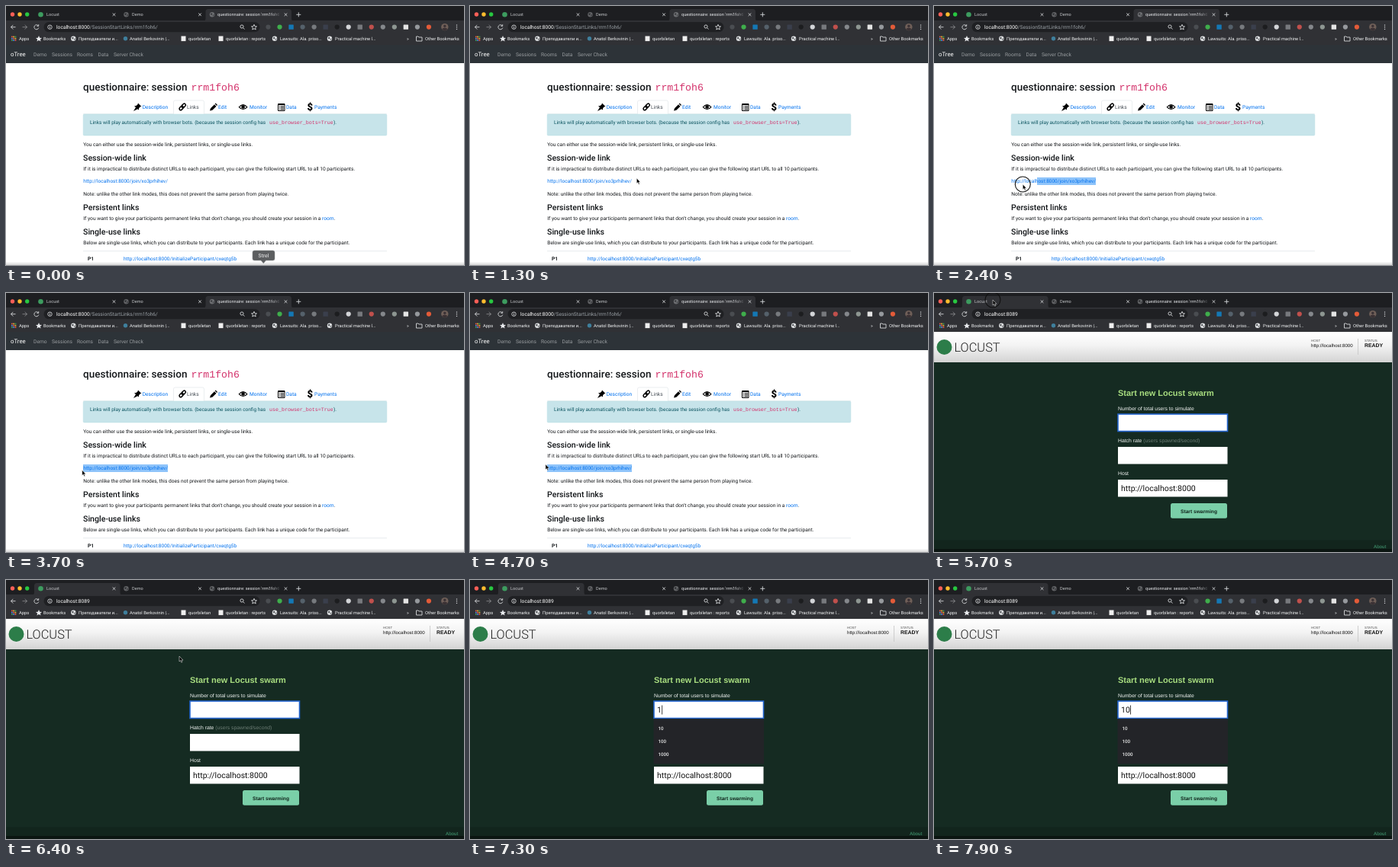
Write an HTML page that moves like this. It is 600 px wide and 340 px high and loops after 8000 ms.

```html
<!DOCTYPE html>
<html lang="en">
<head>
<meta charset="utf-8">
<title>Session links</title>
<style>
html, body { margin: 0; width: 100%; height: 100%; overflow: hidden; }
svg { display: block; width: 600px; height: 340px; font-family: Roboto, Inter, sans-serif; text-rendering: geometricPrecision; }
text { white-space: pre; }
.tabs text { font-size: 5.6px; fill: #c3c5c8; }
.marks text { font-size: 5.8px; fill: #f1f3f4; }
.nav text { font-size: 6.7px; fill: #979b9e; }
.body { font-size: 6.62px; fill: #14171a; }
.body .h { font-size: 10.6px; font-weight: 500; }
.body .a { fill: #0071ee; }
.body .url { font-size: 6.5px; }
.code { font-family: "Liberation Mono", monospace; fill: #d3326b; }
.swarm { font-family: "Liberation Sans", Arial, sans-serif; font-size: 6.8px; fill: #f2f5f3; }
.ui { font-family: Roboto, Inter, sans-serif; }
.line { fill: none; stroke: #d5d7da; stroke-width: .9; }
</style>
</head>
<body>
<svg viewBox="0 0 600 340">
  <defs>
    <linearGradient id="fade" gradientUnits="userSpaceOnUse" x1="347" x2="360">
      <stop stop-color="#e8eaed"/><stop offset="1" stop-color="#e8eaed" stop-opacity="0"/>
    </linearGradient>
    <linearGradient id="head" x2="0" y2="1">
      <stop stop-color="#fff"/><stop offset=".45" stop-color="#f3f3f3"/><stop offset="1" stop-color="#d3d3d3"/>
    </linearGradient>
    <linearGradient id="shade" x2="0" y2="1">
      <stop stop-opacity="0"/><stop offset="1" stop-opacity=".16"/>
    </linearGradient>
    <g id="globe">
      <circle r="3.2" fill="#dfe1e3"/>
      <path d="M-2.4-1.4L0-2 .3-.2-1 .9ZM.8.6L2.4-.6 2.2 1.3 1 2.2Z" fill="#4a4d51"/>
    </g>
    <path id="close" d="M-1.8-1.8L1.8 1.8M1.8-1.8L-1.8 1.8" class="line"/>
  </defs>

  <g id="links" class="body">
    <rect width="600" height="340" fill="#fff"/>
    <rect y="335.5" width="600" height="4.5" fill="url(#shade)"/>
    <rect y="51" width="600" height="24" fill="#2d3338"/>
    <g class="nav">
      <text x="6" y="66.3" style="font-size:7.8px;fill:#fff">oTree</text>
      <text x="36" y="66">Demo</text>
      <text x="60" y="66">Sessions</text>
      <text x="93" y="66">Rooms</text>
      <text x="120.5" y="66">Data</text>
      <text x="141" y="66">Server Check</text>
    </g>
    <text x="101" y="111" style="font-size:13.5px;font-weight:500">questionnaire: session</text>
    <text x="242.5" y="111" class="code" font-size="13.2">rrm1foh6</text>

    <path d="M101 141.7H219.5V126Q219.5 124 221.5 124H257.5Q259.5 124 259.5 126V141.7H499" fill="none" stroke="#dee2e6" stroke-width=".6"/>
    <g class="a">
      <text x="178.7" y="135">Description</text>
      <text x="237" y="135" fill="#495057">Links</text>
      <text x="278" y="135">Edit</text>
      <text x="319" y="135">Monitor</text>
      <text x="367" y="135">Data</text>
      <text x="404" y="135">Payments</text>
    </g>
    <g fill="#000">
      <path d="M173 127.5L177.5 132 175.8 132.3 174 134.3 174 136.5 172.3 135.2 167 138 170 133 168 131.3 170.5 131 172.5 129.2Z"/>
      <g fill="none" stroke="#000" stroke-width="1.5">
        <rect x="-3" y="-1.8" width="6" height="3.6" rx="1.8" transform="translate(232.7 130.8) rotate(-45)"/>
        <rect x="-3" y="-1.8" width="6" height="3.6" rx="1.8" transform="translate(229.7 134) rotate(-45)"/>
      </g>
      <path d="M267 137.5L268 134.2 273 129.2 275.5 131.7 270.3 136.7ZM273.7 128.5L274.7 127.5 277 129.9 276.1 131Z"/>
      <path d="M304.5 132.7Q310.5 125.5 316.7 132.7 310.5 139.5 304.5 132.7Z"/>
      <path d="M306 132.8Q310.5 128.3 315.2 132.8 310.5 137 306 132.8Z" fill="#fff"/>
      <circle cx="310.6" cy="132.5" r="2.3"/>
      <path d="M356.5 128.5H365V137.5H356.5Z" fill="none" stroke="#000"/>
      <path d="M357 129.5H365M358 131.7H359.3M360 131.7H364M358 133.7H359.3M360 133.7H364M358 135.7H359.3M360 135.7H364" stroke="#000"/>
      <text x="398.3" y="137" text-anchor="middle" font-size="13" font-weight="900">$</text>
    </g>

    <rect x="101.2" y="142" width="397.6" height="28" rx="1.5" fill="#c7e4ea" stroke="#b7dce3" stroke-width=".5"/>
    <g fill="#0c5460">
      <text x="110" y="155.2" font-size="6.5">Links will play automatically with browser bots. (because the session config has</text>
      <text x="345" y="155.2" class="code" font-size="6.65">use_browser_bots=True</text>
      <text x="429" y="155.2">).</text>
    </g>

    <text x="101.3" y="184">You can either use the session-wide link, persistent links, or single-use links.</text>
    <text x="101" y="203.2" class="h">Session-wide link</text>
    <text x="101.3" y="216">If it is impractical to distribute distinct URLs to each participant, you can give the following start URL to all 10 participants.</text>
    <rect id="sel" y="225" height="10" fill="#8fc4fa"/>
    <text x="101.3" y="232.3" class="a url">http://localhost:8000/join/xo3prhihev/</text>
    <text x="101.3" y="249">Note: unlike the other link modes, this does not prevent the same person from playing twice.</text>
    <text x="101" y="268" class="h">Persistent links</text>
    <text x="101.3" y="281">If you want to give your participants permanent links that don't change, you should create your session in a <tspan class="a">room</tspan>.</text>
    <text x="101" y="300" class="h">Single-use links</text>
    <text x="101.3" y="312.5">Below are single-use links, which you can distribute to your participants. Each link has a unique code for the participant.</text>
    <path d="M101 321.7H499" stroke="#dee2e6" stroke-width=".7"/>
    <text x="107" y="334" font-weight="700">P1</text>
    <text x="154" y="334" class="a url">http://localhost:8000/InitializeParticipant/cxeqtg5b</text>
    <g id="tip">
      <path d="M325.5 321H349.5Q352 321 352 323.5V331.5Q352 334 349.5 334H340.5L337.3 337.8 334 334H325.5Q323 334 323 331.5V323.5Q323 321 325.5 321Z" fill="#5c5e60" stroke="#86888a" stroke-width=".5"/>
      <text x="337.5" y="329.8" text-anchor="middle" font-size="6.8" fill="#f2f2f2">Strel</text>
    </g>
  </g>

  <g id="swarm" class="swarm">
    <rect width="600" height="340" fill="#152b22"/>
    <rect y="324.5" width="600" height="16" fill="#12251d"/>
    <rect y="336" width="600" height="4" fill="#0b1511"/>
    <rect y="51" width="600" height="40" fill="url(#head)"/>
    <circle cx="13.5" cy="71" r="10" fill="#2c7d49"/>
    <text x="26.5" y="76.8" class="ui" font-weight="300" style="font-size:16.4px;fill:#222">LOCUST</text>
    <g fill="#111">
      <text x="494" y="64" style="font-size:4.4px;fill:#555">HOST</text>
      <text x="494" y="70.7" style="font-size:6.1px">http://localhost:8000</text>
      <text x="564" y="64" style="font-size:4.4px;fill:#555">STATUS</text>
      <text x="564" y="71.3" font-weight="700" style="font-size:6.9px">READY</text>
    </g>
    <path d="M555.5 60V81" stroke="#c4c4c4" stroke-width=".8"/>
    <text x="241" y="135" font-weight="700" style="font-size:10.95px;fill:#a9de80">Start new Locust swarm</text>
    <text x="241" y="153.5">Number of total users to simulate</text>
    <text x="241" y="196">Hatch rate <tspan fill="#6c7d75">(users spawned/second)</tspan></text>
    <text x="241" y="239">Host</text>
    <g fill="#fff">
      <rect x="241" y="159" width="143.5" height="22.5" stroke="#2465cf" stroke-width="1.6"/>
      <rect x="241" y="202" width="143.5" height="22.5"/>
      <rect x="241" y="245" width="143.5" height="22.5"/>
    </g>
    <g class="ui" fill="#111" style="font-size:10.5px">
      <text x="245" y="260">http://localhost:8000</text>
      <text id="typed" x="245" y="174"></text>
    </g>
    <rect x="310" y="276" width="74" height="19.7" rx="2.5" fill="#7acfa8"/>
    <text x="347" y="288.5" text-anchor="middle" font-weight="700" style="font-size:6.64px;fill:#12261d">Start swarming</text>
    <text x="576" y="334.5" style="font-size:6.2px;fill:#45a077">About</text>
    <g id="menu" class="ui" fill="#eceded" font-weight="500" style="font-size:6.2px">
      <rect x="240.5" y="182.3" width="144.5" height="59" fill="#232428"/>
      <text x="246.5" y="197">10</text>
      <text x="246.5" y="214">100</text>
      <text x="246.5" y="231">1000</text>
      <path id="caret" d="M0 164.5V176.5" stroke="#111" stroke-width=".8"/>
    </g>
  </g>

  <g>
    <rect width="600" height="20" fill="#1d1e21"/>
    <rect y="19" width="600" height="32" fill="#303135"/>
    <circle cx="8.5" cy="11" r="2.7" fill="#ff5f57"/>
    <circle cx="18" cy="11" r="2.7" fill="#febc2e"/>
    <circle cx="27.7" cy="11" r="2.7" fill="#28c840"/>
    <path id="tab" d="M34 19.5Q37 19.5 37 16.5V7.5Q37 4 40.5 4H146Q149.5 4 149.5 7.5V16.5Q149.5 19.5 152.5 19.5Z" fill="#303135"/>
    <g class="tabs">
      <circle cx="45.5" cy="11.3" r="3.3" fill="#3d9c5f"/>
      <text x="53" y="13.2">Locust</text>
      <text x="165" y="13.2">Demo</text>
      <text x="277" y="13.2" style="fill:url(#fade)">questionnaire: session 'rrm1foh6'</text>
      <g opacity=".35"><use href="#globe" x="157.5" y="11.3"/><use href="#globe" x="270" y="11.3"/></g>
      <use href="#close" x="141.5" y="11.3"/><use href="#close" x="254" y="11.3"/><use href="#close" x="366.5" y="11.3"/>
      <path d="M380.3 11.3H386.3M383.3 8.3V14.3" class="line"/>
    </g>

    <rect x="49.5" y="21" width="283" height="13.3" rx="6.65" fill="#1f2023"/>
    <path d="M12.5 27.7H6.5M9.3 24.9L6.5 27.7 9.3 30.5" class="line"/>
    <path d="M21.5 27.7H27.5M24.7 24.9L27.5 27.7 24.7 30.5" class="line" opacity=".5"/>
    <path d="M42 25.6A3 3 0 1 0 42.8 28.6M42.7 24.2V26.4H40.5" class="line"/>
    <circle cx="57.5" cy="27.7" r="2.7" class="line"/>
    <path d="M57.5 27.2V29.3M57.5 25.9V26.5" class="line"/>
    <text x="66" y="30" font-size="6.65" fill="#fff">localhost:<tspan id="port"></tspan><tspan id="path" fill="#9aa0a6">/SessionStartLinks/rrm1foh6/</tspan></text>
    <circle cx="309" cy="27" r="2.1" class="line"/><path d="M310.6 28.6L312.5 30.5" class="line"/>
    <path d="M325 24.3L326 26.7 328.5 26.9 326.6 28.5 327.2 31 325 29.7 322.8 31 323.4 28.5 321.5 26.9 324 26.7Z" class="line"/>
    <g id="ext"></g>
    <circle cx="574.8" cy="27.6" r="4.7" fill="#6f5f58"/>
    <path d="M571 30.3Q574.8 26.5 578.6 30.3 574.8 34 571 30.3Z" fill="#3a3134"/>
    <circle cx="574.8" cy="26.2" r="1.7" fill="#3a3134"/>
    <path d="M590.5 24.5V25.7M590.5 27.1V28.3M590.5 29.7V30.9" class="line" style="stroke-width:1.2"/>

    <g class="marks">
      <g id="apps"></g>
      <text x="17" y="45">Apps</text>
      <path d="M43 39L44.2 41.7 47 42 44.9 43.8 45.5 46.5 43 45.1 40.5 46.5 41.1 43.8 39 42 41.8 41.7Z" fill="#e8eaed"/>
      <text x="49" y="45">Bookmarks</text>
      <use href="#globe" x="88.3" y="42.8"/><text x="95" y="45">Преподаватели и...</text>
      <circle cx="156.5" cy="42.8" r="2.7" fill="#3f7f9c"/><text x="162" y="45">Anatol Berkovinin |...</text>
      <rect x="229.5" y="39.5" width="6" height="6.6" fill="#eee"/><text x="239" y="45">quorbiletan</text>
      <rect x="278.5" y="39.5" width="6" height="6.6" fill="#eee"/><text x="288" y="45">quorbiletan : reports</text>
      <use href="#globe" x="352" y="42.8"/><text x="359" y="45">Lawsuits: Ala. priso...</text>
      <use href="#globe" x="424" y="42.8"/><text x="431" y="45">Practical machine l...</text>
      <text x="525" y="45">»</text>
      <path d="M537.5 40H540L541 41H545V46H537.5Z" class="line"/>
      <text x="549" y="45">Other Bookmarks</text>
    </g>
  </g>

  <circle id="ring" r="10" fill="none" stroke="#111" stroke-width="1.1"/>
  <path id="cursor" d="M0 0V7L1.6 5.6 2.7 8.2 3.9 7.7 2.8 5.2H4.9Z" fill="#000" stroke="#fff" stroke-width=".5"/>
</svg>
<script>
const $ = id => document.getElementById(id);
const show = (id, on) => $(id).setAttribute('display', on ? 'inline' : 'none');
const move = (id, [x, y]) => $(id).setAttribute('transform', `translate(${x} ${y})`);

// A leading "s" marks a square icon
const extColors = ['#4a4d51', '#3fae4c', 's#1478b5', '#55616b', '#777a7e', 's#3a3f4c', '#1c1d1f', '#d3d5d8',
  's#77797d', '#c0504c', '#85888c', '#8d9691', 's#e4e4e4', '#96999d', '#e35b38'];
$('ext').innerHTML = extColors.map((c, i) => {
  const x = 343.5 + i * 15.03;
  return c[0] === 's'
    ? `<rect x="${x - 3.2}" y="24.4" width="6.4" height="6.4" rx=".6" fill="${c.slice(1)}"/>`
    : `<circle cx="${x}" cy="27.6" r="3.1" fill="${c}"/>`;
}).join('');

const appColors = ['#e8594b', '#f1b932', '#3fa35a', '#4a86e8'];
$('apps').innerHTML = Array.from({ length: 9 }, (_, i) =>
  `<rect x="${7 + i % 3 * 2.3}" y="${39.6 + Math.floor(i / 3) * 2.3}" width="1.7" height="1.7" fill="${appColors[i % 4]}"/>`).join('');

// Pointer stops: time, x, y
const stops = [
  [500, 337, 342], [1300, 218.3, 226], [1600, 212, 230], [1800, 212, 230], [2400, 116.3, 234], [2800, 99.7, 232.5],
  [4600, 99.7, 232.5], [5500, 77, 9], [5800, 77, 9], [6400, 227, 100], [7000, 262, 166]
];

function pointer(t) {
  const i = stops.findIndex(s => s[0] > t);
  if (i < 0) return stops[stops.length - 1].slice(1);
  if (i === 0) return stops[0].slice(1);
  const [t0, x0, y0] = stops[i - 1], [t1, x1, y1] = stops[i];
  const u = (t - t0) / (t1 - t0), e = u * u * (3 - 2 * u);
  return [x0 + (x1 - x0) * e, y0 + (y1 - y0) * e];
}

const LOOP = 8000, STEP = 100, PRESS = 1800, LAG = 170, SWITCH = 5700, TYPE = 7200;

function draw(now) {
  const t = Math.floor(now % LOOP / STEP) * STEP;
  const swarm = t >= SWITCH;
  show('links', !swarm);
  show('swarm', swarm);
  show('path', !swarm);
  $('port').textContent = swarm ? '8089' : '8000';
  move('tab', [swarm ? 0 : 224.5, 0]);

  show('tip', t < 500);
  // The selection trails the pointer
  const left = Math.max(101, pointer(Math.max(PRESS, t - LAG))[0]);
  $('sel').setAttribute('x', left);
  $('sel').setAttribute('width', Math.max(0, 212 - left));
  show('sel', t > PRESS);

  const typed = t < TYPE ? '' : t < TYPE + 300 ? '1' : '10';
  $('typed').textContent = typed;
  show('menu', typed);
  move('caret', [245.7 + typed.length * 5.9, 0]);

  const p = pointer(t);
  move('cursor', p);
  move('ring', p);
  show('cursor', t >= 500 && t < TYPE);
  show('ring', (t >= PRESS && t < 3000) || t === SWITCH);
}

function frame() {
  draw(performance.now());
  requestAnimationFrame(frame);
}
frame();
</script>
</body>
</html>
```
